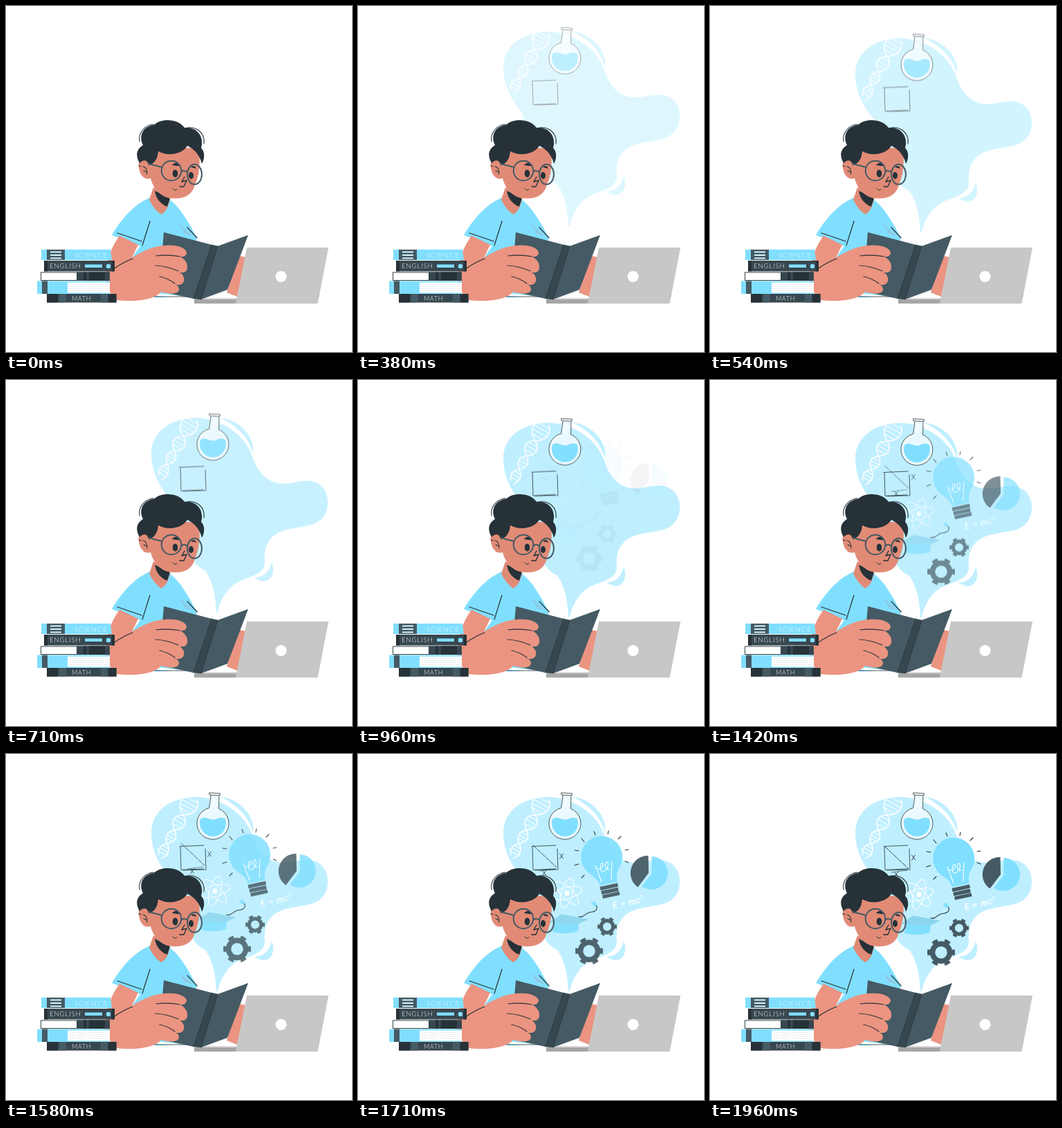
An HTML page without scripts for the animation above (2000 ms loop, 500x500 px).

```html
<!DOCTYPE html>
<html lang="en">
<head>
<meta charset="utf-8">
<title>Studying</title>
<style>
  html, body { margin: 0; width: 100%; height: 100%; overflow: hidden; background: #fff; }
  svg { display: block; width: 100%; height: 100%; }
  text { font-family: Lato, "Open Sans", sans-serif; }
  .blue { fill: #80dfff; }
  .dark { fill: #263238; }
  .slate { fill: #455a64; }
  .face { fill: #e18b77; }
  .skin { fill: #eb9481; }
  .line { fill: none; stroke: #263238; stroke-linecap: round; stroke-linejoin: round; }
  .chalk { fill: none; stroke: #fff; stroke-linecap: round; }
  .gear { fill: none; stroke: #455a64; }
  .first { animation: first 2s infinite; }
  .second { animation: second 2s infinite; }
  @keyframes first {
    0%, 1.5% { opacity: 0; transform: translateY(-51px); animation-timing-function: ease-out; }
    51.5%, 100% { opacity: 1; transform: none; }
  }
  @keyframes second {
    0%, 46% { opacity: 0; transform: translateY(-31px); animation-timing-function: ease-out; }
    96%, 100% { opacity: 1; transform: none; }
  }
</style>
</head>
<body>
<svg viewBox="0 0 500 500">
  <defs>
    <g id="gear" class="gear">
      <circle r="12.500" stroke-width="7.500"/>
      <circle r="17.500" stroke-width="5" pathLength="12" stroke-dasharray=".9 1.1" stroke-dashoffset=".45"/>
    </g>
    <ellipse id="orbit" rx="22" ry="8"/>
    <path id="cross" d="M-2.5-3.5 2.5 3.5M2.5-3.5-2.5 4"/>
  </defs>

  <!-- thought cloud -->
  <g class="first">
    <g fill="#bfefff">
      <path d="M304 343C303 322 300 300 288 283 265 274 245 225 238 180 224 165 210 141 210 114 210 82 238 62 277 62 318 65 347 90 356 118 363 139 376 155 397 157 413 158 423 152 438 153 455 155 465 167 465 184 465 202 455 213 440 217 420 222 398 221 384 235 374 245 373 258 374 273 371 292 345 291 328 304 316 314 309 328 306 343Z"/>
      <path d="M308 61C342 66 360 92 357 113 351 92 336 74 308 61Z"/>
      <path d="M384 270C389 284 385 297 373 298 367 298 363 295 359 293 373 292 381 284 384 270Z"/>
    </g>

    <g class="chalk" stroke-width="1.5" transform="translate(222.500 148.500) rotate(-61)">
      <path d="M-1 3C6 9 14 9 22 0 29-9 37-9 44 0 52 12 62 12 69 0 77-15 92-16 101-6M2-3C8-9 15-8 22 0 29 9 37 9 44 0 52-12 62-12 69 0 77 15 92 16 98 6"/>
      <path stroke-width="1.100" d="M6-5V6M11-7V7M16-5V5M28-6V6M33-7V7M38-6V6M51-7V7M57-9V9M63-7V7M76-8V8M82-11V11M88-12V12M94-10V10"/>
    </g>

    <path fill="#e9f9ff" d="M295 60H308L307.500 79A23 23 0 1 1 293 78Z"/>
    <path class="blue" d="M281 94C289 88 295 98 304 94 310 91 314 92 317 94 321 108 311 119 299 119 286 119 277 106 281 94Z"/>
    <path class="line" stroke-width=".8" d="M294 56 309.500 57 309 60 294.500 59ZM296 60 293.500 78A23 23 0 1 0 307.500 79L308 61"/>
    <path class="chalk" stroke-width="1.500" d="M301 64 300 76M283 88Q288 82 293 81"/>
    <path class="line" stroke-width=".8" d="M251 133.500 286 132M252 134 253 167.500 285 166M288 137 289 166M256 168 289 167"/>
  </g>

  <g class="second">
    <g class="line" stroke-width=".9">
      <path d="M253 134 287 166" stroke-dasharray="7 1.500"/>
      <path d="M262 171 285 168" stroke-width=".6"/>
      <use href="#cross" x="294" y="149.500"/>
      <use href="#cross" x="269" y="174"/>
    </g>

    <path class="blue" d="M349.500 192C346 181 340 180 331 172A30 30 0 1 1 379 164C374 172 373 177 374.500 187Z"/>
    <path class="chalk" stroke-width="1.100" d="M343 163 352 187M367 157 366 184M346 167C350 172 356 163 354 160 350 157 348 172 354 172 361 171 363 160 360 158 356 158 356 171 364 168"/>
    <g transform="rotate(-12 364 200)" class="slate">
      <rect x="351" y="191" width="26" height="5.500"/>
      <rect x="351.500" y="197.300" width="25" height="5.500"/>
      <rect x="352" y="203.600" width="25" height="5"/>
    </g>
    <path class="line" stroke-width="1.100" d="M323 124 327 129M341 114 343 119M362 113 361 118M380 121 376 125M391 140 386 141M391 159 386 157M313 141 319 142M313 163 319 161M323 181 327 177"/>

    <path class="blue" d="M424.500 150A24 24 0 1 1 410 193.500L424.500 175Z"/>
    <path class="slate" d="M419.500 149A25 25 0 0 0 404.500 194.500L420 174Z"/>

    <g transform="translate(369 226) rotate(-13)">
      <text fill="#fff" font-size="13.500" font-weight="700" font-style="italic" letter-spacing=".6">E = mc<tspan dy="-5" font-size="7">2</tspan></text>
    </g>

    <g class="chalk" stroke-width="1.100" transform="translate(302 203)">
      <use href="#orbit" transform="rotate(-15)"/>
      <use href="#orbit" transform="rotate(45)"/>
      <use href="#orbit" transform="rotate(105)"/>
      <circle r="4" fill="#fff" stroke="none"/>
    </g>

    <path class="blue" d="M283 246 319 246 318 258C306 262 293 262 281 259Z"/>
    <path fill="#8cd5ee" d="M276 245 294 233.500 333 241 316 248.500Z"/>
    <path class="line" stroke-width="1.100" d="M319 237C324 240 328 233 334 231 340 230 347 229 345 222L341 219"/>
    <path class="blue" d="M336 217 342 215 346 221 341 222Z"/>

    <use href="#gear" x="334" y="286.700"/>
    <use href="#gear" transform="translate(360 251.500) scale(.7)"/>
  </g>

  <!-- boy -->
  <path class="blue" d="M208 277C186 286 168 306 153 331L194 347 182 364 200 421H250L276 335C263 312 252 290 234 278Z"/>
  <path fill="#8dcbe4" d="M250 315 271 333 259 330Z"/>
  <path class="line" stroke-width="1.200" d="M208 311 197 346M161 328 196 340M262 320 276 335"/>
  <path class="face" d="M213 262 207 280C212 290 218 297 224 301 231 298 235 290 237 278Z"/>
  <path class="dark" d="M215 267 237 278 233 290C225 287 217 280 215 267Z"/>
  <path class="face" d="M207 224C196 217 190 223 192 234 194 246 201 252 209 249 213 265 225 278 242 278 260 279 270 271 273 258 279 245 281 230 279 206L225 203Z"/>
  <path class="dark" d="M193 227C187 217 188 207 198 201 191 188 198 173 214 172 223 162 249 162 258 176 275 174 287 188 282 205 288 211 287 221 283 228 280 215 272 207 262 202 255 214 235 218 220 210 219 222 214 228 206 230 205 222 198 221 193 227Z"/>
  <path class="line" stroke-width="1.100" d="M193 196C191 183 200 172 214 171M262 176C277 174 288 185 286 199M198 232Q204 233 204 243M199 238 203 240M192 231 195 232"/>
  <g class="dark">
    <ellipse cx="244.500" cy="242" rx="3.800" ry="5.500"/>
    <ellipse cx="267.500" cy="245" rx="3.500" ry="5"/>
    <path d="M240 230C244 225 249 226 251 231 247 232 243 230 240 230ZM267 233C270 230 274 231 275 235Z"/>
  </g>
  <path class="line" stroke-width="1.400" d="M258 247 254 254 261 252 257 261 251 261"/>
  <path class="line" stroke-width="1" d="M241 264Q244 268 247 265"/>
  <g fill="none" stroke="#455a64" stroke-width="2">
    <circle cx="239" cy="238" r="14.300"/>
    <ellipse cx="272.500" cy="243.300" rx="10.500" ry="14.500"/>
    <path d="M253 240Q257 236 262 240M225 233 206 228"/>
  </g>

  <!-- laptop and open book -->
  <path class="skin" d="M336 361 347 363 334 420 319 414Z"/>
  <path fill="#a6a6a6" d="M272 424H334V430H272Z"/>
  <path fill="#d8d8d8" d="M272 422H334V424H272Z"/>
  <path fill="#c7c7c7" d="M348 349H466L450.500 430H332Z"/>
  <circle cx="397.500" cy="391" r="8" fill="#fff"/>
  <path fill="#fff" d="M218 415 272 421V424L218 419Z"/>
  <path class="line" stroke-width=".8" d="M215 420H272"/>
  <path class="slate" d="M228 327 297 345 306 347 350 331 320 410 282 424 271 423 221 412Z"/>
  <path fill="#37474f" d="M297 345 306 347 282 424 271 423Z"/>
  <path class="line" stroke-width=".7" d="M297 345 271 423M306 347 282 424"/>

  <path class="skin" d="M164 332 191 345 182 364C197 354 215 346 232 346 247 345 259 349 261 356 261 361 257 363 251 362 259 366 263 372 262 379 261 385 256 386 251 385 258 389 259 397 255 401 251 404 246 403 243 402 251 404 252 411 247 414 240 417 230 415 224 413 215 425 185 428 158 425L144 405C142 380 147 356 164 332Z"/>
  <path class="line" stroke-width="1.200" d="M157 379Q168 371 183 365M217 361Q235 359 251 362M216 375Q233 376 249 383M222 391Q233 393 244 401"/>

  <!-- book stack -->
  <path class="blue" d="M51 352H151L153 367H51Z"/>
  <rect x="59" y="352" width="26" height="15" class="slate"/>
  <path stroke="#d5f4ff" stroke-width="2" d="M64 355.500H80M64 360H80M64 364.500H80"/>
  <text x="98.500" y="363.500" font-size="10" font-weight="300" letter-spacing="1.100" fill="#effbff">SCIENCE</text>

  <rect x="55" y="368" width="102" height="15.500" fill="#37474f"/>
  <path class="dark" d="M55 368H60V383.500H55ZM153 368H157V383.500H153Z"/>
  <text x="63" y="379.300" font-size="9.500" font-weight="300" letter-spacing=".9" fill="#fff">ENGLISH</text>
  <rect x="114" y="373.500" width="25" height="4.500" class="blue"/>
  <circle cx="148" cy="376" r="3.300" class="blue"/>

  <rect x="50.500" y="385" width="98" height="11.500" fill="#fff" stroke="#263238" stroke-width=".9"/>
  <path fill="#37474f" d="M102 384.500H150V397H102Z"/>
  <path class="dark" d="M112 384.500H116V397H112ZM120 384.500H143V397H120Z"/>

  <rect x="45" y="397.500" width="105" height="18.500" class="blue"/>
  <rect x="52" y="397.500" width="8" height="18.500" class="slate"/>
  <rect x="89" y="399.500" width="61" height="15" fill="#fff"/>
  <path stroke="#e3e8ea" stroke-width=".7" stroke-dasharray="9 1 14 2" d="M91 402.500H148M91 405.500H148M91 408.500H148M91 411.500H148"/>

  <rect x="59" y="416" width="100.500" height="12.500" fill="#37474f"/>
  <path class="dark" d="M59 416H75V428.500H59ZM148 416H159.500V428.500H148Z"/>
  <path class="slate" d="M77 416H87V428.500H77ZM137 416H147V428.500H137Z"/>
  <text x="95" y="425.500" font-size="9" font-weight="300" letter-spacing=".7" fill="#fff">MATH</text>
</svg>
</body>
</html>
```
